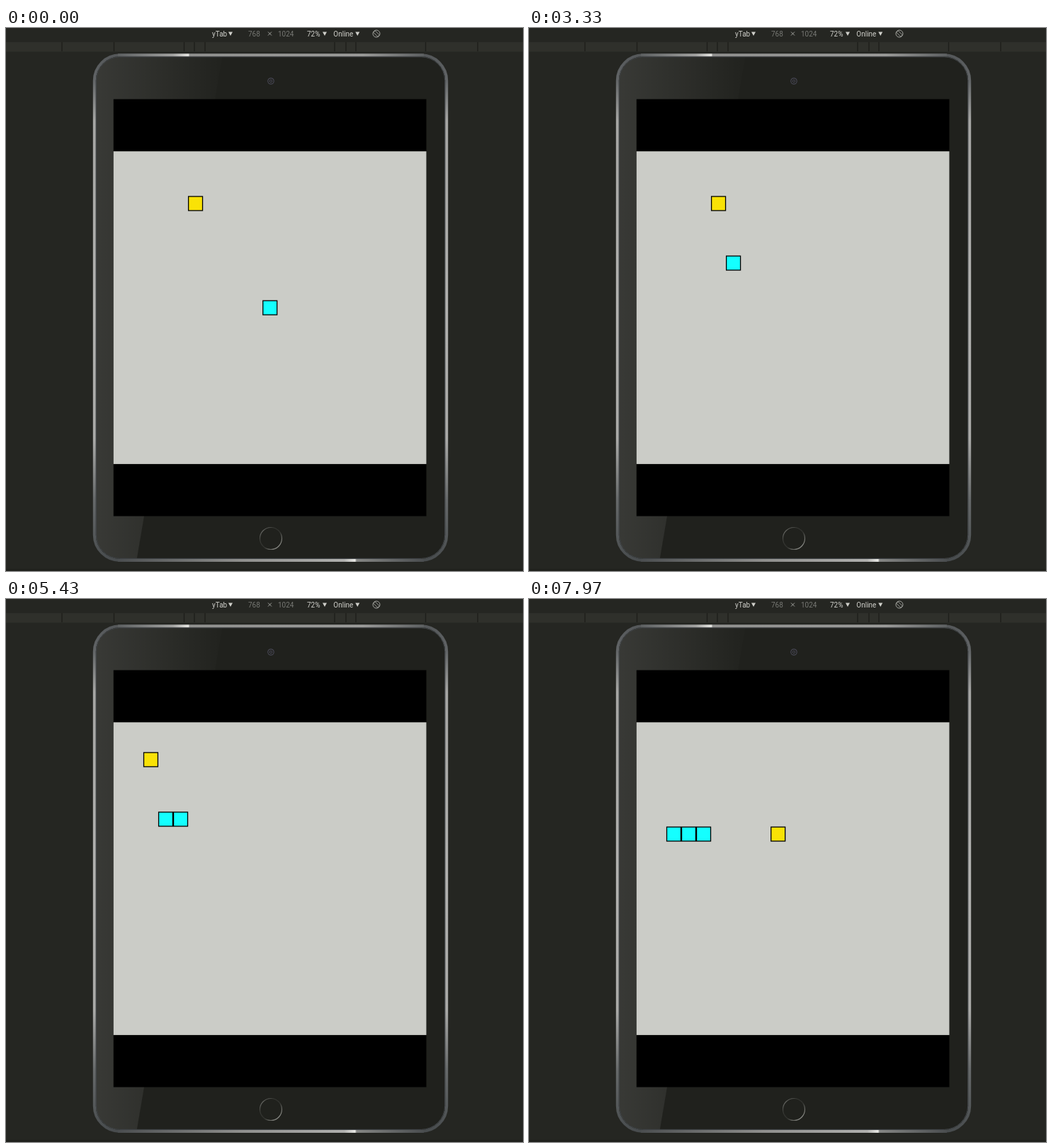
Write an HTML page that moves like this. It is 730 by 767 pixels and loops after 8000 ms.

```html
<!DOCTYPE html>
<html lang="en">
<head>
<meta charset="utf-8">
<title>Snake on a tablet</title>
<style>
  html, body { margin: 0; width: 100%; height: 100%; overflow: hidden; background: #252622; }
  svg { display: block; width: 730px; height: 767px; }
  text { font: 10px Roboto, sans-serif; fill: #cfcfca; }
  .dim { fill: #777874; }
</style>
</head>
<body>
<svg viewBox="0 0 730 767">
  <defs>
    <linearGradient id="rim" x2="0" y2="1">
      <stop offset="0" stop-color="#55585a"/>
      <stop offset=".05" stop-color="#626567"/>
      <stop offset=".13" stop-color="#a6a6a4"/>
      <stop offset=".5" stop-color="#b2b2b0"/>
      <stop offset=".76" stop-color="#aaaaa8"/>
      <stop offset=".88" stop-color="#66696a"/>
      <stop offset="1" stop-color="#484c4e"/>
    </linearGradient>
    <linearGradient id="topEdge" gradientUnits="userSpaceOnUse" x1="158" x2="590">
      <stop offset="0" stop-color="#5c5f60"/>
      <stop offset=".18" stop-color="#a2a2a0"/>
      <stop offset=".23" stop-color="#e4e4e0"/>
      <stop offset=".235" stop-color="#8f8f8d"/>
      <stop offset=".8" stop-color="#9a9a98"/>
      <stop offset="1" stop-color="#5c5f60"/>
    </linearGradient>
    <linearGradient id="bottomEdge" gradientUnits="userSpaceOnUse" x1="158" x2="590">
      <stop offset="0" stop-color="#4a4d4f"/>
      <stop offset=".4" stop-color="#8f8f8d"/>
      <stop offset=".74" stop-color="#b0b0ae"/>
      <stop offset=".775" stop-color="#e8e8e4"/>
      <stop offset=".78" stop-color="#858684"/>
      <stop offset="1" stop-color="#4a4d4f"/>
    </linearGradient>
    <linearGradient id="glare" gradientUnits="userSpaceOnUse" x1="128" x2="300">
      <stop offset="0" stop-color="#fff" stop-opacity=".11"/>
      <stop offset="1" stop-color="#fff" stop-opacity=".01"/>
    </linearGradient>
    <linearGradient id="button" x2="1" y2="1">
      <stop offset="0" stop-color="#858682"/>
      <stop offset=".3" stop-color="#3a3b37"/>
      <stop offset=".55" stop-color="#30312d"/>
      <stop offset="1" stop-color="#b4b5b0"/>
    </linearGradient>
    <clipPath id="bodyClip"><rect x="127" y="41" width="493" height="708" rx="34"/></clipPath>
  </defs>

  <rect width="730" height="767" fill="#252622"/>
  <rect y="20" width="730" height="13.5" fill="#2f302b"/>
  <path d="M79 20v13M152.5 20v13M251.5 20v13M266 20v13M281 20v13M464 20v13M480 20v13M494 20v13M592.5 20v13M666 20v13"
        stroke="#1d1e1a" stroke-width="1.3"/>
  <rect y="764" width="730" height="3" fill="#20211d"/>

  <text x="291" y="11.5">yTab</text>
  <text x="342" y="11.5" class="dim">768</text>
  <text x="384" y="11.5" class="dim">1024</text>
  <text x="425" y="11.5">72%</text>
  <text x="462.3" y="11.5">Online</text>
  <path d="M314 5.5h6l-3 5.5zM447 5.5h6l-3 5.5zM493.3 5.5h6l-3 5.5z" fill="#cfcfca"/>
  <path d="M370 5.5l5 5m0-5l-5 5" stroke="#a0a19c"/>
  <g transform="translate(523 8) rotate(-45)" fill="none" stroke="#a5a6a1" stroke-width=".9">
    <circle r="5"/>
    <rect x="-1.7" y="-4.3" width="3.4" height="8.6" rx=".6"/>
  </g>

  <!-- tablet -->
  <rect x="124.8" y="38.3" width="497.4" height="713.6" rx="36" fill="#20211d" stroke="url(#rim)" stroke-width="4"/>
  <path d="M158 38.3H590" stroke="url(#topEdge)" stroke-width="4"/>
  <path d="M158 751.9H590" stroke="url(#bottomEdge)" stroke-width="4"/>
  <path d="M120 36H306L184 754H120z" fill="url(#glare)" clip-path="url(#bodyClip)"/>
  <rect x="127.3" y="40.8" width="492.4" height="708.6" rx="33.5" fill="none" stroke="#43474a"/>
  <g fill="none" stroke="#464653">
    <circle cx="374" cy="75" r="4.2" stroke-width="1.2"/>
    <circle cx="374" cy="75" r="1.7"/>
  </g>
  <circle cx="374" cy="721" r="15.5" fill="none" stroke="url(#button)" stroke-width="1.2"/>

  <rect x="151.8" y="100.5" width="441.7" height="589" fill="#000"/>
  <rect x="151.8" y="174.2" width="441.7" height="441.7" fill="#cbccc7"/>
  <g id="cells" stroke="#000" stroke-width="1.3"></g>
</svg>
<script>
  const LOOP = 8000, CELL = 441.7 / 21, LEFT = 151.8, TOP = 174.2;
  const STEPS = { U: [0, -1], D: [0, 1], L: [-1, 0], R: [1, 0] };
  const moves = "DDDD" + "LLLL" + "UUUUUUUUUUU" + "LL" + "DDD" + "L" + "UUUU" + "L" + "DDDDD" + "RR";
  const foods = [[5, 3], [2, 2], [9, 7]];

  // Ticks fall on a 30 fps grid: six frames apart, sometimes seven.
  const longTicks = [2, 6, 10, 15, 19, 23, 26, 29, 33, 36];
  const tickTimes = [...moves].map((_, k) =>
    Math.round((13 + 6 * k + longTicks.filter(n => n <= k).length) * 10 / 3) * 10);

  const trail = [[10, 10]];
  for (const move of moves) {
    const [x, y] = trail.at(-1), [dx, dy] = STEPS[move];
    trail.push([x + dx, y + dy]);
  }

  const square = ([col, row], color) =>
    `<rect x="${LEFT + col * CELL + .65}" y="${TOP + row * CELL + .65}" width="${CELL - 1.1}" height="${CELL - 1.1}" fill="${color}"/>`;

  const cells = document.getElementById("cells");
  let shown = -1;

  function draw(step) {
    // A meal counts on the tick after the head reaches it.
    const eaten = (step > 20) + (step > 30);
    const snake = trail.slice(Math.max(0, step - eaten), step + 1);
    cells.innerHTML = snake.map(cell => square(cell, "#14ffff")).join("") + square(foods[eaten], "#f9e206");
  }

  function frame() {
    const time = performance.now() % LOOP;
    const step = tickTimes.filter(tick => tick <= time).length;
    if (step !== shown) draw(shown = step);
    requestAnimationFrame(frame);
  }
  frame();
</script>
</body>
</html>
```
